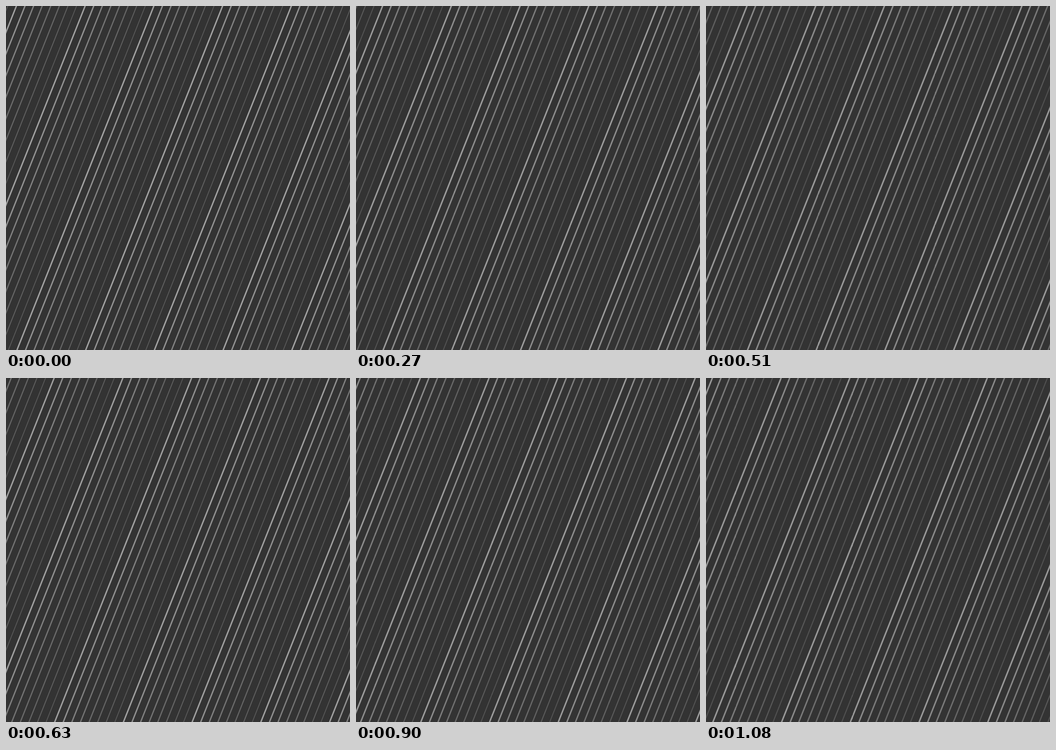
An HTML page without scripts for the animation above (1110 ms loop, 748 by 748 pixels).

```html
<!DOCTYPE html>
<html lang="en">
<head>
<meta charset="utf-8">
<title>Drifting stripes</title>
<style>
  html, body { margin: 0; width: 100%; height: 100%; overflow: hidden; background: #333; }
  svg { display: block; width: 100vw; height: 100vh; }
  /* 37 steps of 3.905px, then a jump back */
  #drift { animation: drift 1110ms steps(37, end) infinite; }
  @keyframes drift {
    from { transform: translateX(0); }
    to { transform: translateX(144.485px); }
  }
</style>
</head>
<body>
<svg viewBox="0 0 748 748">
  <defs>
    <path id="line" d="M7.96-20-305.6 768"/>
    <!-- eight stripes fading from bright to dim, one period is 149.45 wide -->
    <g id="band" fill="none">
      <use href="#line" x="0" stroke="#a2a2a2" stroke-width="3"/>
      <use href="#line" x="18.68" stroke="#929292" stroke-width="2.9"/>
      <use href="#line" x="37.36" stroke="#828282" stroke-width="2.8"/>
      <use href="#line" x="56.04" stroke="#757575" stroke-width="2.7"/>
      <use href="#line" x="74.72" stroke="#6c6c6c" stroke-width="2.6"/>
      <use href="#line" x="93.41" stroke="#666" stroke-width="2.4"/>
      <use href="#line" x="112.09" stroke="#616161" stroke-width="2"/>
      <use href="#line" x="130.77" stroke="#5c5c5c" stroke-width="1.7"/>
    </g>
  </defs>
  <rect width="748" height="748" fill="#333"/>
  <g id="drift">
    <g transform="translate(22.6)">
      <use href="#band" x="-298.9"/>
      <use href="#band" x="-149.45"/>
      <use href="#band" x="0"/>
      <use href="#band" x="149.45"/>
      <use href="#band" x="298.9"/>
      <use href="#band" x="448.35"/>
      <use href="#band" x="597.8"/>
      <use href="#band" x="747.25"/>
      <use href="#band" x="896.7"/>
    </g>
  </g>
</svg>
</body>
</html>
```
